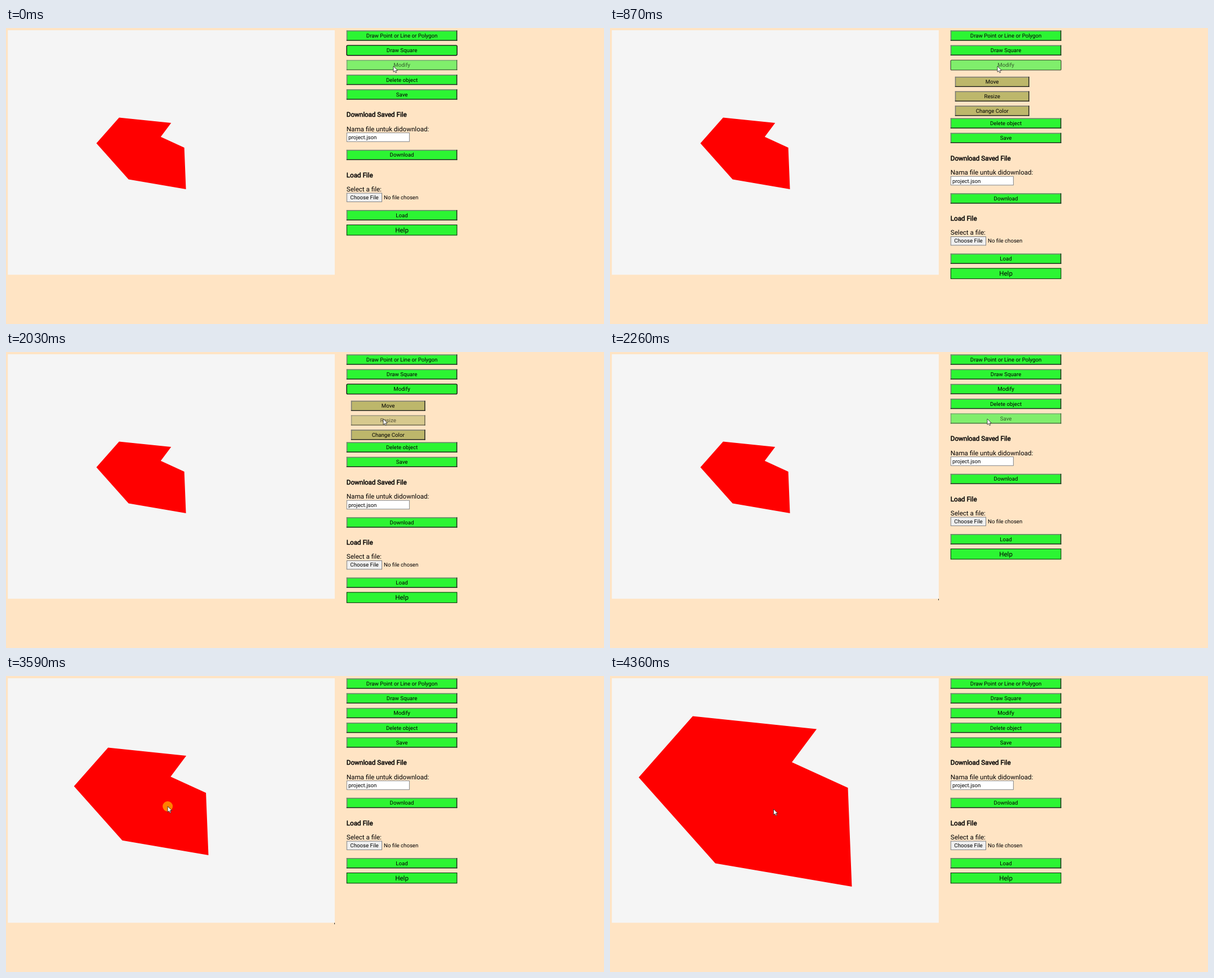
Write an HTML page with a canvas that moves like this. It is 1062x527 px and loops after 4910 ms.

```html
<!DOCTYPE html>
<html lang="en">
<head>
<meta charset="utf-8">
<title>Polygon editor</title>
<style>
  html, body { margin: 0; height: 100%; overflow: hidden; background: #ffe4c4; }
  canvas { display: block; }
</style>
</head>
<body>
<canvas id="stage" width="1062" height="527"></canvas>
<script>
const ctx = document.getElementById('stage').getContext('2d');
const LOOP = 4910;
const GREEN = '#2cf533', KHAKI = '#bdb76b';
const SMALL = 9.67, NORMAL = 11.6;
const LEFT = 604.8, WIDTH = 196.5, ROW = 26.2, MENU_HEIGHT = 77.5;

const linear = p => p;
const smooth = p => p * p * (3 - 2 * p);
const gather = p => p ** 1.4;

// Pointer strokes; each runs in evenly spaced hard steps
const rest = { x: 688, y: 68, scale: 1 };
const moves = [
  { from: 1330, to: 1790, steps: 7, ease: linear, x: 673, y: 111, scale: 1 },
  { from: 1880, to: 2030, steps: 3, ease: linear, x: 670, y: 119, scale: 1 },
  { from: 2340, to: 2720, steps: 6, ease: smooth, x: 306, y: 220, scale: 1 },
  { from: 2810, to: 2960, steps: 3, ease: linear, x: 286, y: 229.5, scale: 1 },
  { from: 3360, to: 3750, steps: 6, ease: gather, x: 288, y: 234, scale: 1.885 },
  { from: 3900, to: 3960, steps: 2, ease: linear, x: 290.5, y: 237, scale: 2.38 }
];

const center = [239.9, 223.1], fullScale = 2.38;
const outline = [[51, 180.5], [147, 71.5], [367, 94.5], [323, 153.5], [422.5, 199], [429.5, 375], [187, 333.5]];

const within = (v, from, to) => v >= from && v < to;
const mix = (a, b, p) => a + (b - a) * p;

function poseAt(t) {
  let pose = rest;
  for (const move of moves) {
    if (t < move.from) break;
    const interval = (move.to - move.from) / (move.steps - 1);
    const step = Math.floor((t - move.from) / interval + 0.1) + 1;
    const p = move.ease(Math.min(1, step / move.steps));
    pose = {
      x: mix(pose.x, move.x, p),
      y: mix(pose.y, move.y, p),
      scale: mix(pose.scale, move.scale, p)
    };
  }
  return pose;
}

function rect(x, y, w, h, color) {
  ctx.fillStyle = color;
  ctx.fillRect(x, y, w, h);
}

function text(str, x, midY, size, align = 'left', bold = false) {
  ctx.font = `${size}px Roboto, sans-serif`;
  ctx.textAlign = align;
  ctx.fillStyle = ctx.strokeStyle = '#000';
  const y = midY + size * 0.355;
  ctx.fillText(str, x, y);
  if (bold) {
    ctx.lineWidth = 0.5;
    ctx.strokeText(str, x, y);
  }
}

function box(x, y, w, h, fill, border) {
  rect(x, y, w, h, fill);
  ctx.strokeStyle = border;
  ctx.lineWidth = 0.9;
  ctx.strokeRect(x + 0.45, y + 0.45, w - 0.9, h - 0.9);
}

function button(label, midY, state, { x = LEFT, w = WIDTH, color = GREEN } = {}) {
  const h = 18.2, y = midY - h / 2, edge = 1.4;
  const hovered = within(state.x, x, x + w) && within(state.y, y, y + h);
  ctx.globalAlpha = hovered ? 0.6 : 1;
  if (state.focus === label) {
    ctx.beginPath();
    ctx.roundRect(x + 0.2, y + 0.2, w - 0.4, h - 0.4, 2);
    ctx.fillStyle = color;
    ctx.fill();
    ctx.strokeStyle = '#101010';
    ctx.lineWidth = edge;
    ctx.stroke();
  } else {
    rect(x, y, w, h, color);
    rect(x, y, w, edge, '#767676');
    rect(x, y, edge, h, '#767676');
    rect(x, y + h - edge, w, edge, '#212121');
    rect(x + w - edge, y, edge, h, '#212121');
  }
  text(label, x + w / 2, midY, SMALL, 'center');
  ctx.globalAlpha = 1;
}

function panel(state) {
  const dy = state.menu ? MENU_HEIGHT : 0;
  const labels = ['Draw Point or Line or Polygon', 'Draw Square', 'Modify', 'Delete object', 'Save'];
  labels.forEach((label, i) => button(label, 13.6 + i * ROW + (i > 2 ? dy : 0), state));
  if (state.menu) {
    ['Move', 'Resize', 'Change Color'].forEach((label, i) =>
      button(label, 95.9 + i * 25.8, state, { x: 612.8, w: 131.7, color: KHAKI }));
  }

  text('Download Saved File', LEFT, 154 + dy, NORMAL, 'left', true);
  text('Nama file untuk didownload:', LEFT, 179.4 + dy, NORMAL);
  box(LEFT, 186.2 + dy, 112, 16.5, '#fff', '#767676');
  text('project.json', 608, 194.7 + dy, SMALL);
  button('Download', 226 + dy, state);

  text('Load File', LEFT, 261.4 + dy, NORMAL, 'left', true);
  text('Select a file:', LEFT, 286.7 + dy, NORMAL);
  box(LEFT, 293.6 + dy, 63.2, 16.2, '#efefef', '#767676');
  text('Choose File', 636.5, 301.5 + dy, SMALL, 'center');
  text('No file chosen', 671, 301.5 + dy, SMALL);
  button('Load', 333.3 + dy, state);

  box(LEFT, 350 + dy, WIDTH, 19.3, GREEN, '#111');
  text('Help', LEFT + WIDTH / 2, 359.7 + dy, NORMAL, 'center');
}

function polygon(scale) {
  const k = scale / fullScale;
  ctx.beginPath();
  for (const [x, y] of outline) ctx.lineTo(mix(center[0], x, k), mix(center[1], y, k));
  ctx.fillStyle = '#f00';
  ctx.fill();
}

const arrow = new Path2D('M0 0V10.3L2.4 8.2L4 11.8L5.7 11L4.2 7.5H7.4Z');
function cursor(x, y, pressed) {
  if (pressed) {
    ctx.beginPath();
    ctx.arc(x, y, 9, 0, Math.PI * 2);
    ctx.fillStyle = 'rgba(255, 255, 0, 0.5)';
    ctx.fill();
  }
  ctx.save();
  ctx.translate(x, y);
  ctx.fillStyle = '#fff';
  ctx.fill(arrow);
  ctx.strokeStyle = '#222';
  ctx.lineWidth = 0.8;
  ctx.stroke(arrow);
  ctx.restore();
}

function draw(t) {
  const { x, y, scale } = poseAt(t);
  const focus = t < 640 ? 'Draw Square' : t < 2110 ? 'Modify' : t < 2260 ? 'Resize' : '';
  const pressed = within(t, 640, 870) || within(t, 2110, 2260) || within(t, 3130, 4360);

  rect(0, 0, 1062, 527, '#ffe4c4');
  rect(3.3, 4, 580.5, 435.3, '#f5f5f5');
  polygon(scale);
  if (within(t, 2260, 2810) || within(t, 3360, 4360)) rect(583, 439.5, 1, 2.5, '#222');
  panel({ x, y, focus, menu: within(t, 870, 2260) });
  cursor(x, y, pressed);
}

ctx.textRendering = 'geometricPrecision';
const start = performance.now();
function tick() {
  draw((performance.now() - start) % LOOP);
  requestAnimationFrame(tick);
}
tick();
</script>
</body>
</html>
```
